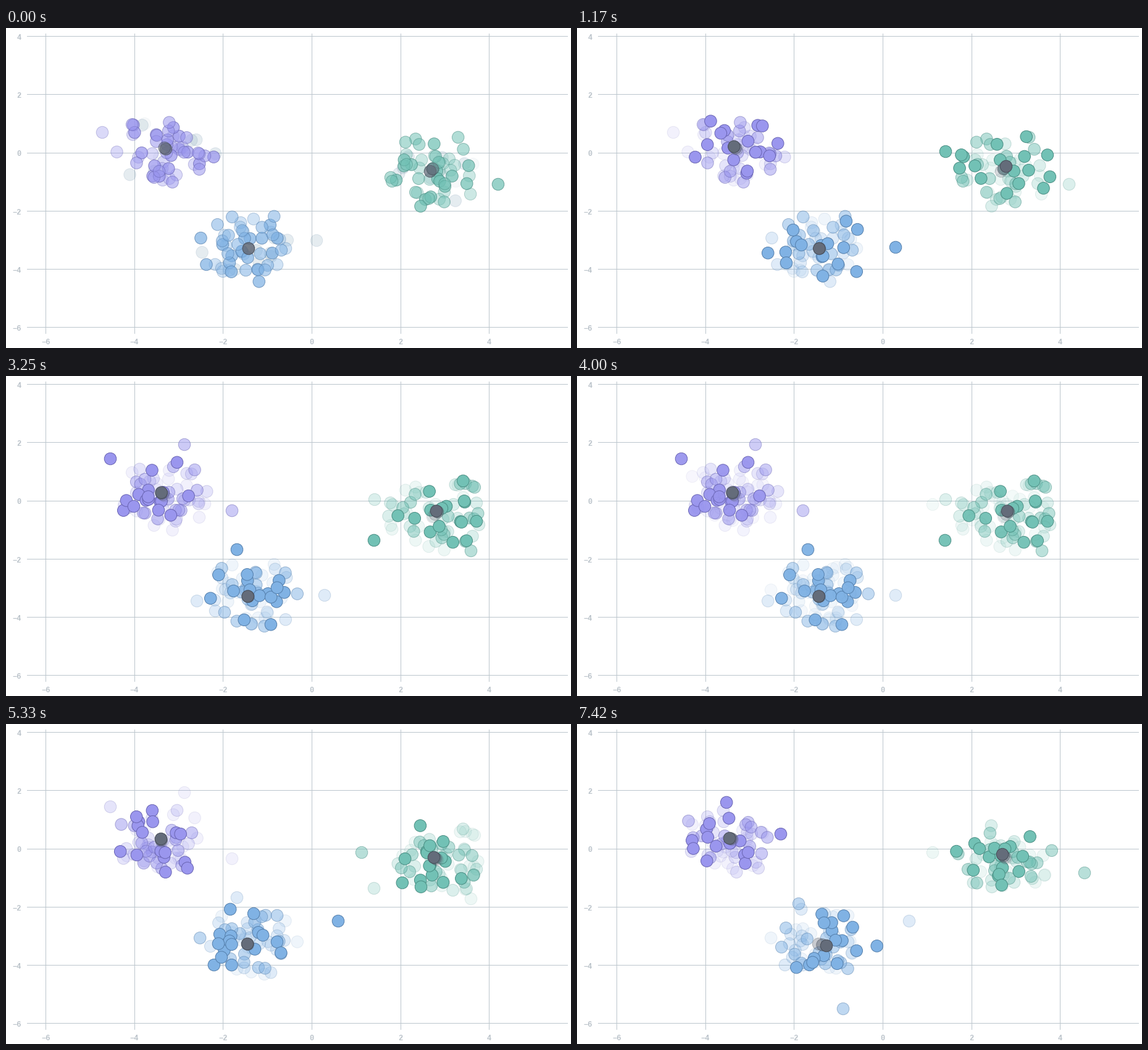
These frames come from a looping animation (915 by 518 pixels, 8000 ms). A matplotlib script:

```python
import matplotlib.pyplot as plt
import numpy as np
from matplotlib.animation import FuncAnimation
from matplotlib.colors import to_rgb

W, H, DPI = 915, 518, 64
PT = 72 / DPI                      # points per pixel
LOOP, STEP = 8000, 40
PERIOD, LEAD = 1040, 160           # one batch of data arrives per period

GRID, LABEL = "#bcc6cd", "#bcc4cb"
# fill and edge of each cluster: violet, green, blue
CLUSTERS = [("#9a96ee", "#6a65b4"), ("#72c1b5", "#4a8f84"), ("#80b2e4", "#5580ad")]
UNLABELLED = ("#749bb1", "#6d8aa8")
CENTRE = ("#646c7a", "#474d58")

BATCHES = range(-5, 7)
SPREAD = np.array([43, 31])

# the cluster centres drift between these key batches
KEYS = [-2, 1, 4, 6]
DRIFT = np.array([
    [(259, 196), (252, 190), (251, 186), (247, 185)],
    [(687, 232), (699, 220), (693, 216), (689, 211)],
    [(393, 357), (392, 357), (391, 356), (404, 359)],
])

# stray points far from any centre
STRAYS = {
    -4: [(503, 344)],
    -3: [(156, 169)],
    -2: [(797, 253)],
    0: [(597, 200), (516, 355)],
    1: [(289, 111), (366, 218), (753, 283)],
    2: [(169, 134), (596, 266), (374, 281)],
    3: [(576, 208)],
    4: [(538, 319)],
    5: [(822, 241), (431, 461), (359, 291)],
}


def centres(b):
    return np.array([[np.interp(b, KEYS, path[:, k]) for k in (0, 1)]
                     for path in DRIFT])


def cloud(rng, centre, n):
    """Gaussian cloud without its far tail."""
    z = rng.normal(size=(200, 2))
    return centre + z[np.hypot(*z.T) < 1.95][:n] * SPREAD


def batch_size(b):
    return {-5: 2, -4: 8}.get(b, 16)


def make_points():
    rng = np.random.default_rng(5)
    xy, fill, edge, born = [], [], [], []
    for b in BATCHES:
        mid = centres(b)
        pts = np.vstack([cloud(rng, m, batch_size(b)) for m in mid]
                        + [np.reshape(STRAYS.get(b, []), (-1, 2))])
        for p in pts:
            nearest = np.argmin(np.hypot(*(mid - p).T))
            f, e = UNLABELLED if b < -3 else CLUSTERS[nearest]
            xy.append(p)
            fill.append(to_rgb(f))
            edge.append(to_rgb(e))
            born.append(b)
    return [np.array(v) for v in (xy, fill, edge, born)]


def make_centres():
    shown = range(-2, 7)
    xy = np.vstack([centres(b) for b in shown])
    fill, edge = (np.tile(to_rgb(c), (len(xy), 1)) for c in CENTRE)
    return xy, fill, edge, np.repeat(shown, len(CLUSTERS))


def level(age):
    """Opacity halves with every new batch and ends after four."""
    return np.where((age >= 0) & (age <= 3), 0.5 ** np.clip(age, 0, 4), 0)


def opacity(born, t):
    batch, phase = divmod(t + LEAD, PERIOD)
    age = batch - 1 - born
    blend = 0.08 if phase < 140 else 0.55 if phase < 290 else 1
    return level(age - 1) * (1 - blend) + level(age) * blend


def to_x(v):
    return 495.5 + 71.8 * v


def to_y(v):
    return 202.1 - 47.1 * v


def name(v):
    return str(v).replace("-", "\u2212")


fig = plt.figure(figsize=(W / DPI, H / DPI), dpi=DPI, facecolor="white")
ax = fig.add_axes([0, 0, 1, 1])
ax.set_xlim(0, W)
ax.set_ylim(H, 0)
ax.axis("off")

font = dict(family="Liberation Mono", weight="bold", size=12 * PT, color=LABEL)
for v in range(-6, 5, 2):
    x, y = to_x(v), to_y(v)
    ax.plot([34, 909], [np.floor(y)] * 2, color=GRID, lw=PT, zorder=1)
    ax.plot([np.floor(x)] * 2, [9, 494], color=GRID, lw=PT, zorder=1)
    ax.text(25, y + 0.8, name(v), ha="right", va="center_baseline", **font)
    ax.text(x - 0.5, 512, name(v), ha="center", va="baseline", **font)

layers = []
for z, data in enumerate((make_points(), make_centres())):
    dots = ax.scatter([], [], s=(19.5 * PT) ** 2, linewidths=PT, zorder=3 + z)
    layers.append((dots, data))


def draw(i):
    t = i * STEP + STEP // 2
    for dots, (xy, fill, edge, born) in layers:
        a = opacity(born, t)
        on = a > 0
        dots.set_offsets(xy[on])
        dots.set_facecolors(np.column_stack([fill[on], a[on]]))
        dots.set_edgecolors(np.column_stack([edge[on], a[on]]))
    return [dots for dots, _ in layers]


anim = FuncAnimation(fig, draw, frames=LOOP // STEP, interval=STEP,
                     repeat=True, repeat_delay=0, blit=False)
plt.show()
```
